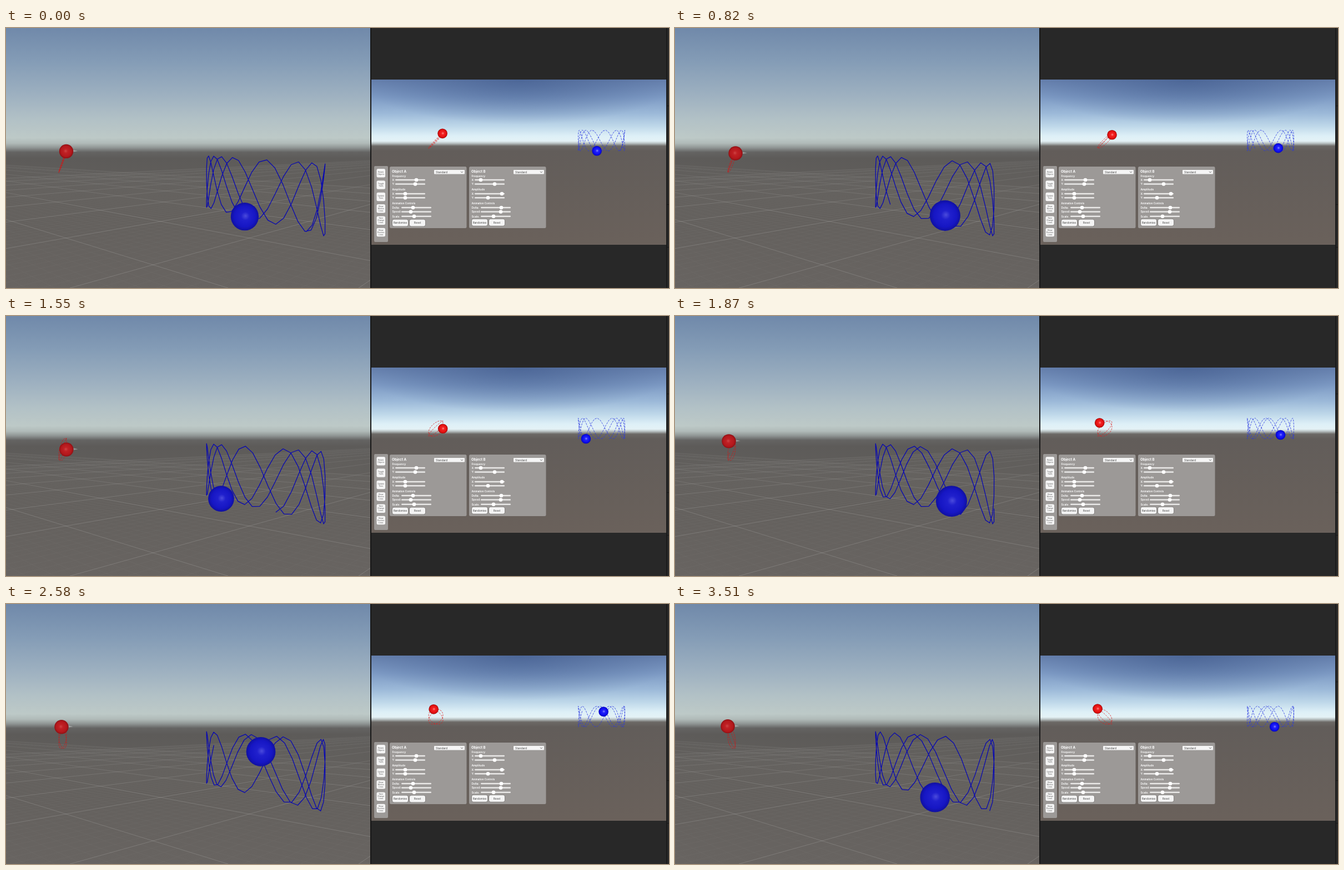
Recreate the animation shown at these times as an HTML page with a canvas. Size 1194 by 469 pixels, loop 3640 ms.

```html
<!DOCTYPE html>
<html lang="en">
<head>
<meta charset="utf-8">
<title>Lissajous objects</title>
<style>
html, body { margin: 0; width: 100%; height: 100%; overflow: hidden; background: #282828; }
canvas { display: block; }
</style>
</head>
<body>
<canvas id="stage" width="1194" height="469"></canvas>
<script>
const W = 1194, H = 469, LOOP = 3640, STEP = 35.455, LAST = 99, TAU = Math.PI * 2;
const ctx = document.getElementById('stage').getContext('2d');
const back = document.createElement('canvas');
back.width = W;
back.height = H;
const bg = back.getContext('2d');

function rect(c, x, y, w, h, fill, r = 0) {
  c.fillStyle = fill;
  c.beginPath();
  c.roundRect(x, y, w, h, r);
  c.fill();
}

function vertical(c, y0, y1, stops) {
  const g = c.createLinearGradient(0, y0, 0, y1);
  for (const [y, color] of stops) g.addColorStop((y - y0) / (y1 - y0), color);
  return g;
}

function label(s, x, y, size, color = '#fff', weight = 400, align = 'left') {
  bg.font = `${weight} ${size}px Inter, Roboto, sans-serif`;
  bg.fillStyle = color;
  bg.textAlign = align;
  bg.fillText(s, x, y);
}

// Lines of one parallel family share a vanishing point on the horizon
function gridFamily(vx, x0, gap, count, alpha) {
  const g = vertical(bg, 222, H, [[222, 'rgba(190,190,188,0)'], [252, `rgba(190,190,188,${alpha * 0.45})`],
    [330, `rgba(190,190,188,${alpha})`], [H, `rgba(190,190,188,${alpha})`]]);
  bg.strokeStyle = g;
  bg.lineWidth = 1;
  bg.beginPath();
  for (let i = -count; i <= count; i++) {
    bg.moveTo(vx, 222);
    bg.lineTo(x0 + i * gap, H);
  }
  bg.stroke();
}

function drawScene() {
  bg.save();
  bg.beginPath();
  bg.rect(0, 0, 656, H);
  bg.clip();
  rect(bg, 0, 0, 656, H, vertical(bg, 0, H, [
    [0, '#7089aa'], [60, '#849cb6'], [120, '#9db0c0'], [165, '#b2c1c6'], [198, '#bdc9c7'],
    [208, '#b0bab8'], [216, '#8f9594'], [224, '#646362'], [235, '#5d5b59'], [300, '#625f5c'], [H, '#686461']]));
  gridFamily(-400, 400, 52, 60, 0.035);
  gridFamily(1000, -405, 52, 70, 0.035);
  gridFamily(-400, 400, 520, 6, 0.22);
  gridFamily(1000, -405, 520, 7, 0.22);
  bg.restore();
}

function drawGame() {
  rect(bg, 656, 0, 538, H, '#282828');
  rect(bg, 656, 0, 2, H, '#171717');
  rect(bg, 1189, 0, 1.5, H, '#171717');
  for (const y of [140, 318, 395]) rect(bg, 1190, y, 4, 1, '#171717');
  bg.save();
  bg.beginPath();
  bg.rect(658, 93, 531, 298);
  bg.clip();
  rect(bg, 658, 93, 531, 298, vertical(bg, 93, 391, [
    [93, '#6680ad'], [125, '#7d9ac4'], [155, '#9dbad9'], [178, '#c0d9ea'], [195, '#def0f7'],
    [204, '#e4f2f6'], [208, '#b9c2c3'], [213, '#6b6865'], [222, '#625d5a'], [391, '#6a615b']]));
  const g = bg.createRadialGradient(924, 0, 0, 924, 0, 290);
  g.addColorStop(0, 'rgba(66,92,142,.7)');
  g.addColorStop(1, 'rgba(66,92,142,0)');
  bg.save();
  bg.translate(0, 93);
  bg.scale(1, 0.28);
  rect(bg, 658, 0, 531, 400, g);
  bg.restore();
  bg.restore();
}

function slider(name, x, y, from, knob) {
  label(name, x, y + 1.8, 4.8, '#fff', 600);
  rect(bg, from, y - 1.2, 54, 2.4, '#e9e8e7', 1.2);
  bg.fillStyle = '#fff';
  bg.beginPath();
  bg.arc(knob, y, 3.3, 0, TAU);
  bg.fill();
}

function button(s, x, y) {
  rect(bg, x - 0.5, y - 0.5, 29, 13, '#6f6d6b', 3.5);
  rect(bg, x, y, 28, 12, '#f4f4f4', 3);
  label(s, x + 14, y + 7.7, 4.7, '#444', 400, 'center');
}

function panel(x, title, knobs, dy) {
  rect(bg, x, 250, 138.5, 111, '#9c9997', 2.5);
  label(title, x + 4, 261, 6.2, '#fff', 700);
  rect(bg, x + 80, 256, 55, 7.6, '#f5f5f5', 1);
  label('Standard', x + 83, 261.8, 4.9, '#444');
  bg.strokeStyle = '#444';
  bg.lineWidth = 0.8;
  bg.beginPath();
  bg.moveTo(x + 128, 258.8);
  bg.lineTo(x + 130, 260.8);
  bg.lineTo(x + 132, 258.8);
  bg.stroke();
  label('Frequency', x + 4.5, 268.5, 4.8, '#fff', 600);
  label('Amplitude', x + 4.5, 293, 4.8, '#fff', 600);
  label('Animation Controls', x + 4.5, 318.3, 4.5, '#fff', 600);
  const rows = [['X:', 274], ['Y:', 281.5], ['X:', 299], ['Y:', 306.3],
    ['Delta:', 324], ['Speed:', 331.5], ['Scale:', 339.7]];
  rows.forEach(([name, y], i) => slider(name, x + 4.5, y, x + (i < 4 ? 10 : 21), x + knobs[i]));
  button('Randomise', x + 5, 345.5 - dy);
  button('Reset', x + 36, 345.5 - dy);
}

function drawUi() {
  rect(bg, 663, 249, 25, 137, '#9c9997', 2);
  const tools = [['Rotate', 'Objects'], ['Toggle', 'Trails'], ['Update', 'Time'],
    ['Show', 'Motion', 'Lines'], ['Save', 'Change', 'Lines'], ['Show', 'Position', 'Lines']];
  tools.forEach((words, i) => {
    const y = 254 + i * 21.35;
    rect(bg, 667.5, y, 15.5, 15.5, '#f5f5f5', 2.5);
    words.forEach((s, j) => label(s, 675.2, y + 9 + (j - (words.length - 1) / 2) * 4, 3.3, '#555', 400, 'center'));
  });
  panel(691, 'Object A', [48, 46, 28, 28, 42, 38, 44], 0);
  panel(834, 'Object B', [21, 46, 59, 34, 58, 57, 44], 0.7);
}

// Normalised positions at step k
function blueAt(k) {
  return [Math.cos(TAU * (0.0208 * k - 0.282)), -Math.cos(TAU * (0.091 * k + 0.03))];
}
function redAt(k) {
  const y = 0.0413 * k - 0.07;
  const shift = 0.01 + 0.0047 * k * (k < 0 ? 0.25 : 1);
  return [Math.cos(TAU * (y + shift)), Math.cos(TAU * y)];
}

// Projections into the two views: x, y and scale
function blueScene([u, v]) {
  const w = 1 - 0.168 * u;
  return [(450 + 28.3 * u) / w, (291 - 32.7 * u - 55 * v) / w, 1 / w];
}
const blueGame = ([u, v]) => [1072.5 + 42 * u, 203 - 19 * v, 1];
const redScene = ([u, v]) => [102 + 7 * u, 240.5 - 20 * v, 1];
const redGame = ([u, v]) => [774 + 13 * u, 203 - 14 * v, 1];

const views = [
  { at: blueAt, to: blueScene, size: 88, line: '#0606b4', width: 1.25, dash: [], r: 26,
    tones: ['#4b4bdc', '#2020cd', '#1616c4', '#1010a0'], hx: 0.06 },
  { at: redAt, to: redScene, size: 44, line: '#c81c1c', width: 0.9, dash: [3, 1.5], r: 12.7,
    tones: ['#cd4444', '#bf2024', '#b4181c', '#8e1014'], hx: -0.1, marker: true },
  { at: blueAt, to: blueGame, size: 88, line: '#2a38e0', width: 0.8, dash: [3.5, 1.8], r: 8.8,
    tones: ['#8a8cff', '#2222fb', '#0c0cee', '#0606b8'], hx: 0.08 },
  { at: redAt, to: redGame, size: 44, line: '#dc2020', width: 0.8, dash: [3, 1.8], r: 8.8,
    tones: ['#ff8c88', '#f32222', '#e41010', '#a00a0a'], hx: 0.08 }
];

function drawTrail(view, k) {
  ctx.strokeStyle = view.line;
  ctx.lineWidth = view.width;
  ctx.lineJoin = 'round';
  ctx.setLineDash(view.dash);
  ctx.beginPath();
  for (let i = k - view.size; i <= k; i++) {
    const [x, y] = view.to(view.at(i));
    ctx.lineTo(x, y);
  }
  ctx.stroke();
  ctx.setLineDash([]);
}

function drawBall(view, k) {
  const [x, y, s] = view.to(view.at(k));
  const r = view.r * s;
  if (view.marker) {
    ctx.fillStyle = 'rgba(205,208,208,.5)';
    ctx.beginPath();
    ctx.moveTo(x + r, y - 2.5);
    ctx.lineTo(x + r + 8, y - 0.5);
    ctx.lineTo(x + r, y + 1);
    ctx.fill();
  }
  const hx = x + view.hx * r, hy = y - 0.05 * r;
  const g = ctx.createRadialGradient(hx, hy, 0, x, y, r);
  [0, 0.3, 0.75, 1].forEach((p, i) => g.addColorStop(p, view.tones[i]));
  ctx.fillStyle = g;
  ctx.beginPath();
  ctx.arc(x, y, r, 0, TAU);
  ctx.fill();
}

function draw(now) {
  const t = now % LOOP;
  const k = Math.min(LAST, Math.floor((t + 11) / STEP));
  ctx.drawImage(back, 0, 0);
  for (const view of views) {
    drawTrail(view, k);
    drawBall(view, k);
  }
}

drawScene();
drawGame();
drawUi();
let start;
function tick(now) {
  start ??= now;
  draw(Math.max(0, now - start));
  requestAnimationFrame(tick);
}
draw(0);
requestAnimationFrame(tick);
</script>
</body>
</html>
```
